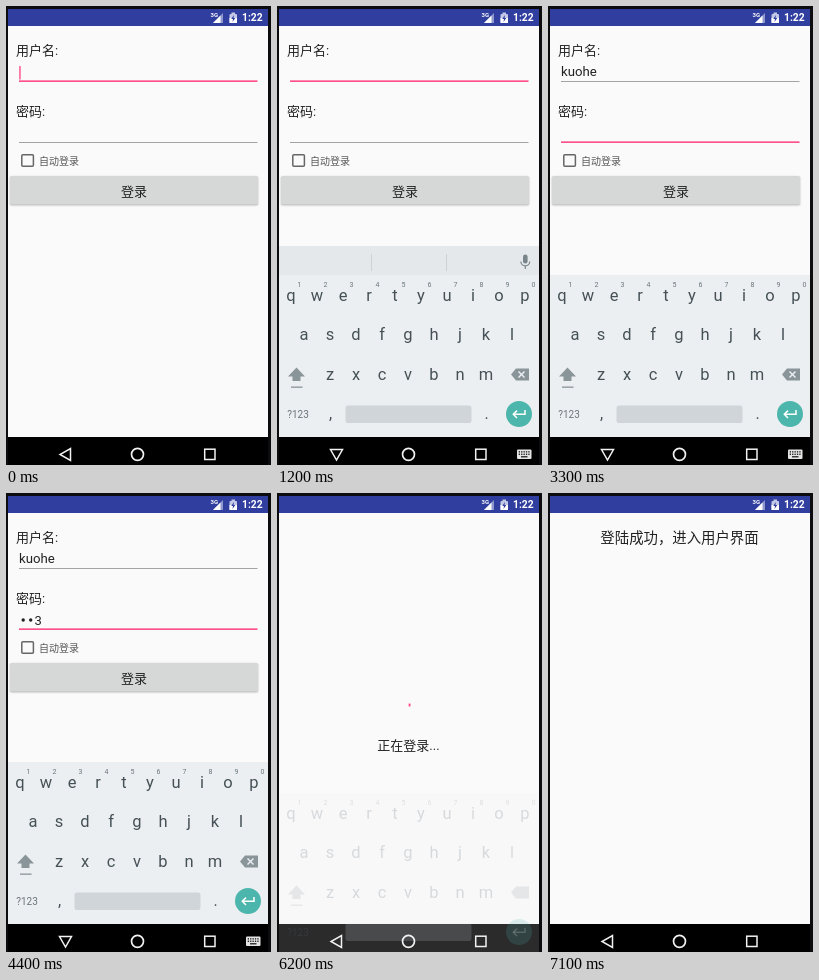
Recreate the animation shown at these times as an HTML page with a canvas. Size 265 by 459 pixels, loop 8000 ms.

```html
<!DOCTYPE html>
<html lang="zh">
<head>
<meta charset="utf-8">
<style>
html, body { margin: 0; width: 100%; height: 100%; overflow: hidden; background: #0c0c0e; }
canvas { display: block; width: 265px; height: 459px; }
</style>
</head>
<body>
<canvas id="stage"></canvas>
<script>
const LOOP = 8000, PINK = '#ff4081', PAGE = '#fafafa', INK = '#222', KEY = '#455157';
const FONT = "Roboto, 'Noto Sans CJK SC', 'Noto Sans CJK', sans-serif";
const USER = 'kuohe';
const HINTS = [['know', 'keep'], ['kudos', 'kung'], ['Kuo', 'quo'], ['knob', 'Kush'], ['Mirel', 'Corvo']];

const canvas = document.getElementById('stage');
const c = canvas.getContext('2d');
const dpr = window.devicePixelRatio || 1;
canvas.width = 265 * dpr;
canvas.height = 459 * dpr;

const within = (t, ...spans) => spans.some(([a, b]) => t >= a && t < b);

function rect(x, y, w, h, color) {
  c.fillStyle = color;
  c.fillRect(x, y, w, h);
}

function box(x, y, w, h, r, color) {
  c.fillStyle = color;
  c.beginPath();
  c.roundRect(x, y, w, h, r);
  c.fill();
}

function disc(x, y, r, color) {
  c.fillStyle = color;
  c.beginPath();
  c.arc(x, y, r, 0, 7);
  c.fill();
}

function poly(points, color, width) {
  c.beginPath();
  for (let i = 0; i < points.length; i += 2) c.lineTo(points[i], points[i + 1]);
  if (width) {
    c.strokeStyle = color;
    c.lineWidth = width;
    c.stroke();
  } else {
    c.fillStyle = color;
    c.fill();
  }
}

function text(s, x, y, size, color = INK, align = 'left', weight = 400) {
  c.font = `${weight} ${size}px ${FONT}`;
  c.textAlign = align;
  c.fillStyle = color;
  c.fillText(s, x, y);
}

// Draws a layer shifted down by dy and faded to alpha.
function layer(dy, alpha, draw) {
  c.save();
  c.translate(0, dy);
  c.globalAlpha = alpha;
  draw();
  c.restore();
}

function statusBar() {
  rect(2, 3, 260, 17, '#303f9f');
  text('3G', 204.5, 11, 6, '#fff', 'left', 700);
  poly([207, 17, 217, 7, 217, 17], '#8f98cc');
  poly([207, 17, 214.5, 9.5, 214.5, 17], '#fff');
  rect(225.5, 6.5, 3.5, 2, '#c3c8e6');
  box(223.5, 8, 7.5, 9, 1, '#c3c8e6');
  rect(223.5, 12, 7.5, 5, '#fff');
  poly([228, 9, 225.2, 13, 227, 13, 226.5, 16, 229.3, 12, 227.5, 12], '#303f9f');
  text('1:22', 236, 15.3, 10.3, '#fff', 'left', 700);
}

function navIcons(keyboardOpen) {
  const white = '#f2f2f2';
  poly(keyboardOpen ? [53.5, 443.5, 65.5, 443.5, 59.5, 454, 53.5, 443.5, 65.5, 443.5]
                    : [64.5, 442.5, 64.5, 454.5, 54, 448.5, 64.5, 442.5, 64.5, 454.5], white, 1.5);
  c.beginPath();
  c.arc(131.5, 448.3, 6, 0, 7);
  c.lineWidth = 1.7;
  c.stroke();
  c.lineWidth = 1.5;
  c.strokeRect(198.7, 443.2, 10.3, 10.3);
  if (!keyboardOpen) return;
  box(240, 443.5, 14.5, 9.5, 1, '#e4e4e4');
  for (let i = 0; i < 10; i++) rect(241.7 + i % 5 * 2.4, i < 5 ? 445.2 : 447.6, 1.3, 1.3, '#111');
  rect(244, 450.2, 6.5, 1.2, '#111');
}

function field(y, focused) {
  if (focused) rect(13, y - 0.6, 238.5, 1.5, PINK);
  else rect(13, y, 238.5, 1, '#a3a3a3');
}

function checkbox(t) {
  const ripple = Math.sin(Math.PI * (t - 4900) / 600);
  if (within(t, [5000, 5400])) disc(21.7, 155, 7 + (t - 5000) / 75, `rgba(255,64,129,${0.22 * ripple})`);
  if (t >= 5100) {
    box(15, 148, 13.3, 13, 1.5, PINK);
    poly([17.5, 154.8, 20.3, 157.7, 26, 151.5], '#fff', 1.5);
  } else {
    c.strokeStyle = '#666';
    c.lineWidth = 1.5;
    c.beginPath();
    c.roundRect(15.8, 148.8, 11.6, 11.4, 1);
    c.stroke();
  }
}

function loginPage(t) {
  const onPassword = t >= 2700;
  text('用户名:', 10, 49, 13);
  field(75, !onPassword);
  const name = USER.slice(0, t < 1500 ? 0 : (t - 1400) / 100);
  text(name, 13, 70, 13.2);
  const nameEnd = 13 + c.measureText(name).width;
  if (name && !onPassword) rect(13, 72, nameEnd - 13, 1, '#333');
  if (within(t, [0, 200], [700, 1200], [1500, 2400])) rect(nameEnd + 0.3, 60, 1.3, 13.5, PINK);

  text('密码:', 10, 110, 13);
  field(136, onPassword);
  const typed = [3500, 3800, 4000].filter(at => t >= at).length;
  for (let i = 0; i < typed; i++) {
    const x = 17.2 + 7.5 * i;
    if (i < typed - 1 || t >= 5400) disc(x, 127, 1.7, INK);
    else text(i + 1, x, 131.5, 13, INK, 'center');
  }
  if (within(t, [2800, 3300], [3500, 4400], [4900, 5400])) rect(13.3 + 7.5 * typed, 121.3, 1.3, 13.5, PINK);

  checkbox(t);
  text('自动登录', 33, 158.7, 10, '#555');

  const raised = t >= 5700;
  c.save();
  c.shadowColor = raised ? 'rgba(0,0,0,.5)' : 'rgba(0,0,0,.3)';
  c.shadowBlur = (raised ? 5 : 2) * dpr;
  c.shadowOffsetY = (raised ? 1.5 : 0.7) * dpr;
  box(4, 170, 248, 28.5, 1.5, '#d6d7d7');
  c.restore();
  text('登录', 128, 189.5, 13, INK, 'center');
}

function suggestions(t) {
  rect(2, 240, 260, 29.5, '#e4e8ea');
  rect(94, 248, 1, 17, '#ccd2d5');
  rect(169, 248, 1, 17, '#ccd2d5');
  const gray = '#78848a';
  box(246, 248.5, 4.6, 9, 2.3, gray);
  c.strokeStyle = gray;
  c.lineWidth = 1.2;
  c.beginPath();
  c.arc(248.3, 255.5, 4.4, 0, Math.PI);
  c.moveTo(248.3, 260);
  c.lineTo(248.3, 263);
  c.stroke();
  if (!within(t, [1500, 2700])) return;
  const n = Math.min(5, (t - 1400) / 100);
  const [left, right] = HINTS[n - 1];
  text(left, 60.5, 260.5, 13, gray, 'center');
  text(USER.slice(0, n), 131, 260.5, 13, '#59656b', 'center');
  text(right, 202, 260.5, 13, gray, 'center');
  for (const x of [127.5, 131.5, 135.5]) disc(x, 267, 1.2, '#4a555a');
}

function keyboard() {
  rect(2, 269, 260, 162, '#eceff1');
  [...'qwertyuiop'].forEach((k, i) => {
    text(k, 14 + 26 * i, 294.5, 16.5, KEY, 'center');
    text((i + 1) % 10, 22.5 + 26 * i, 280.5, 7, '#69757b', 'center');
  });
  [...'asdfghjkl'].forEach((k, i) => text(k, 27 + 26 * i, 334, 16.5, KEY, 'center'));
  [...'zxcvbnm'].forEach((k, i) => text(k, 53 + 26 * i, 374, 16.5, KEY, 'center'));

  const gray = '#8a959a';
  poly([19.5, 361.5, 28, 370.5, 23.5, 370.5, 23.5, 375, 15.5, 375, 15.5, 370.5, 11, 370.5], gray);
  rect(14, 380.5, 11.5, 1.3, gray);
  poly([234, 368.5, 239, 362.5, 252, 362.5, 252, 374.5, 239, 374.5], gray);
  poly([241.5, 365.5, 247.5, 371.5], '#eceff1', 1.4);
  poly([247.5, 365.5, 241.5, 371.5], '#eceff1', 1.4);

  text('?123', 21, 412, 10, '#69757b', 'center');
  text(',', 53.5, 413, 16, KEY, 'center');
  box(68.5, 399.5, 126, 17.5, 2.5, '#cfd5d8');
  text('.', 209.5, 413, 16, KEY, 'center');
  disc(242, 408, 13, '#4db6ac');
  poly([248, 404, 248, 408.3, 236.5, 408.3], '#fff', 1.5);
  poly([240, 404.6, 236.3, 408.3, 240, 412], '#fff', 1.5);
}

// Eases the arc's leading end along the curve (.2,0)-(.1,1)-(.5,1).
function arcEnd(p) {
  let lo = 0, hi = 1;
  for (let i = 0; i < 20; i++) {
    const s = (lo + hi) / 2, r = 1 - s;
    const x = 0.6 * s * r * r + 0.3 * s * s * r + 0.5 * s ** 3;
    if (x < p) lo = s; else hi = s;
  }
  return lo * lo * (3 - 2 * lo);
}

function waitPage(t) {
  rect(2, 20, 260, 411, PAGE);
  const age = Math.max(0, Math.min(t, 6700) - 6200);
  const start = -Math.PI / 2 + 2 * Math.PI * (age / 1333 * 0.25 + age / 6665 * 2);
  const sweep = 2 * Math.PI * Math.max(0.02, 0.75 * arcEnd(age / 1333));
  c.strokeStyle = PINK;
  c.lineWidth = 2.9;
  c.beginPath();
  c.arc(131.7, 226, 14, start, start + sweep);
  c.stroke();
  text('正在登录...', 131.5, 257, 13, INK, 'center');
}

function userPage() {
  rect(2, 20, 260, 411, PAGE);
  text('登陆成功，进入用户界面', 131.5, 49.7, 14.4, INK, 'center');
}

// Offset and opacity of the keyboard, or null when it is hidden.
function keyboardPose(t) {
  if (t < 500 || t >= 6300) return null;
  if (t < 600) return [30, 0.2];
  if (t < 700) return [5.7, 0.85];
  if (t < 6100) return [0, 1];
  return t < 6200 ? [10, 0.65] : [31, 0.18];
}

function draw(t) {
  c.setTransform(dpr, 0, 0, dpr, 0, 0);
  rect(0, 0, 265, 459, '#0c0c0e');
  c.save();
  c.beginPath();
  c.rect(2, 3, 260, 456);
  c.clip();
  rect(2, 20, 260, 411, PAGE);
  if (t < 6200) loginPage(t);
  if (within(t, [6100, 7100])) {
    if (t < 6200) layer(14, 0.5, () => waitPage(t));
    else waitPage(t);
  }
  if (t >= 6900) layer(...(t < 7000 ? [15, 0.45] : t < 7100 ? [3, 0.9] : [0, 1]), userPage);
  statusBar();
  rect(2, 431, 260, 28, '#000');
  const pose = keyboardPose(t);
  if (pose) layer(...pose, () => {
    if (t < 2800) suggestions(t);
    keyboard();
  });
  navIcons(t >= 500 && t < 6200);
  c.restore();
}

const origin = performance.now();
function tick() {
  const t = (performance.now() - origin) % LOOP;
  draw(Math.floor(t / 100) * 100);
  requestAnimationFrame(tick);
}
tick();
</script>
</body>
</html>
```
